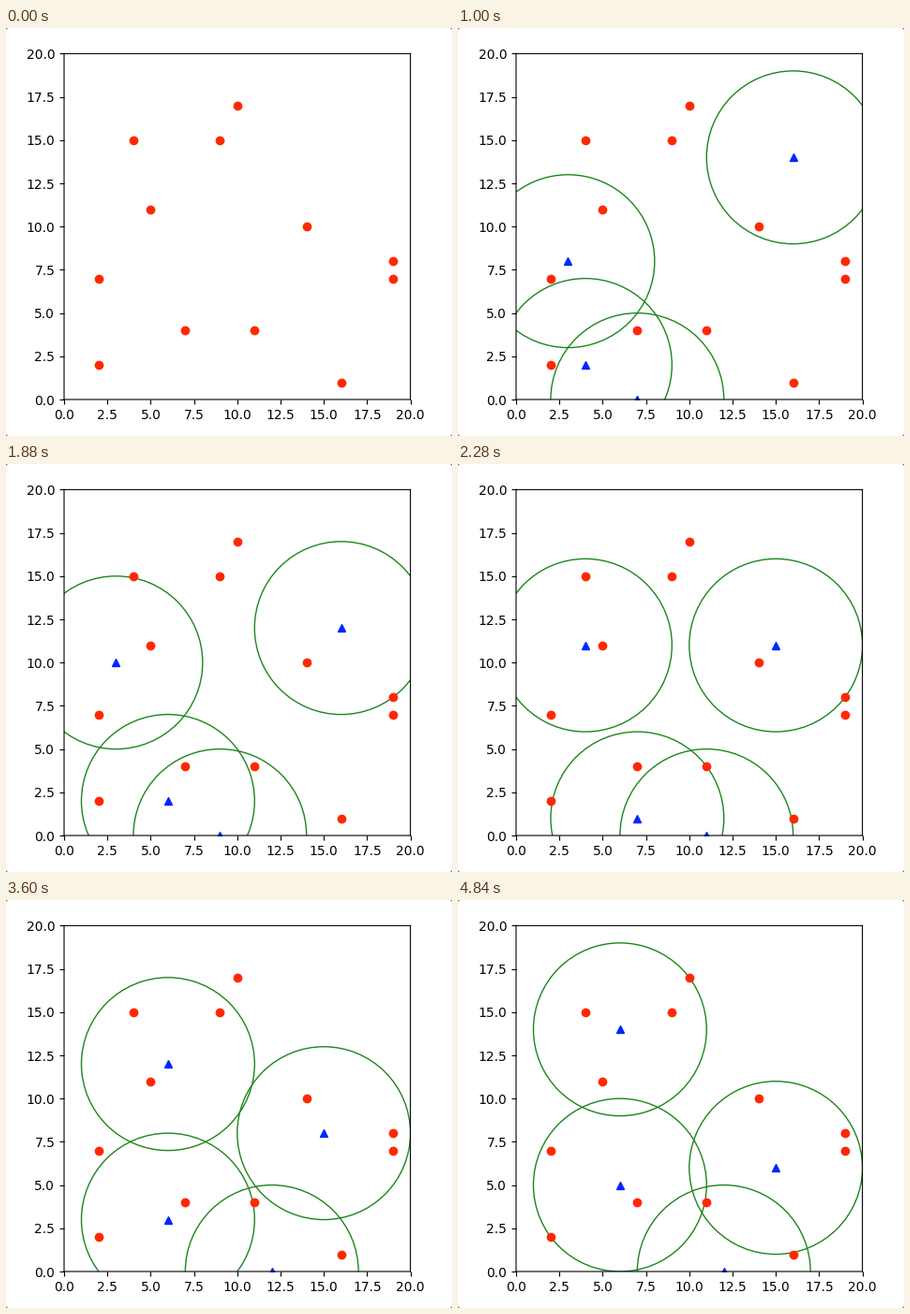
These frames come from a looping animation (476x436 px, 4.92 s). A matplotlib script:

```python
import matplotlib.pyplot as plt
from matplotlib.animation import FuncAnimation
from matplotlib.patches import Circle, Polygon

W, H, DPI = 476, 436, 100
FRAME_MS, FRAMES = 40, 123
START_MS, STEP_MS = 40, 370
LEFT, BASE, SIDE = 62, 397, 369.6
RANGE = 5
RED, BLUE, GREEN = "#ff2800", "#0026ff", "#1c861c"

TARGETS = [(2, 2), (2, 7), (4, 15), (5, 11), (7, 4), (9, 15), (10, 17),
           (11, 4), (14, 10), (16, 1), (19, 7), (19, 8)]

# Each agent: first cell, then one unit move per step.
AGENTS = [
    ((3, 6), "UUUURURURUU"),
    ((16, 16), "DDDDLDDDDDD"),
    ((2, 2), "RRRRRDUULUU"),
    ((5, 0), "RRRRRRURDUD"),
]
MOVES = {"U": (0, 1), "D": (0, -1), "L": (-1, 0), "R": (1, 0)}


def walk(start, moves):
    path = [start]
    for m in moves:
        dx, dy = MOVES[m]
        x, y = path[-1]
        path.append((x + dx, y + dy))
    return path


paths = [walk(*a) for a in AGENTS]

fig = plt.figure(figsize=(W / DPI, H / DPI), dpi=DPI, facecolor="white")
ax = fig.add_axes([LEFT / W, (H - BASE) / H, SIDE / W, SIDE / H])
ax.set(xlim=(0, 20), ylim=(0, 20))
ticks = [2.5 * i for i in range(9)]
ax.set_xticks(ticks)
ax.set_yticks(ticks)
for spine in ax.spines.values():
    spine.set_snap(False)

# Slightly rounded corners of the window
for x, sx in ((0, 1), (W, -1)):
    for y, sy in ((0, 1), (H, -1)):
        pts = [(x, y), (x + 2 * sx, y), (x, y + 2 * sy)]
        fig.add_artist(Polygon([(px / W, py / H) for px, py in pts],
                               transform=fig.transFigure, fc="#777777", lw=0))

ax.plot(*zip(*TARGETS), "o", color=RED, ms=6, snap=False)
rings = [ax.add_patch(Circle(p[0], RANGE, fill=False, ec=GREEN, lw=1))
         for p in paths]
marks, = ax.plot([], [], "^", color=BLUE, ms=6, snap=False)


def draw(i):
    t = i * FRAME_MS - START_MS
    shown = t >= 0
    step = max(0, min(t // STEP_MS, len(paths[0]) - 1))
    cells = [p[step] for p in paths]
    for ring, cell in zip(rings, cells):
        ring.center = cell
        ring.set_visible(shown)
    marks.set_data(*zip(*cells))
    marks.set_visible(shown)
    return [*rings, marks]


anim = FuncAnimation(fig, draw, frames=FRAMES, interval=FRAME_MS,
                     repeat=True, repeat_delay=0, blit=False)
plt.show()
```
